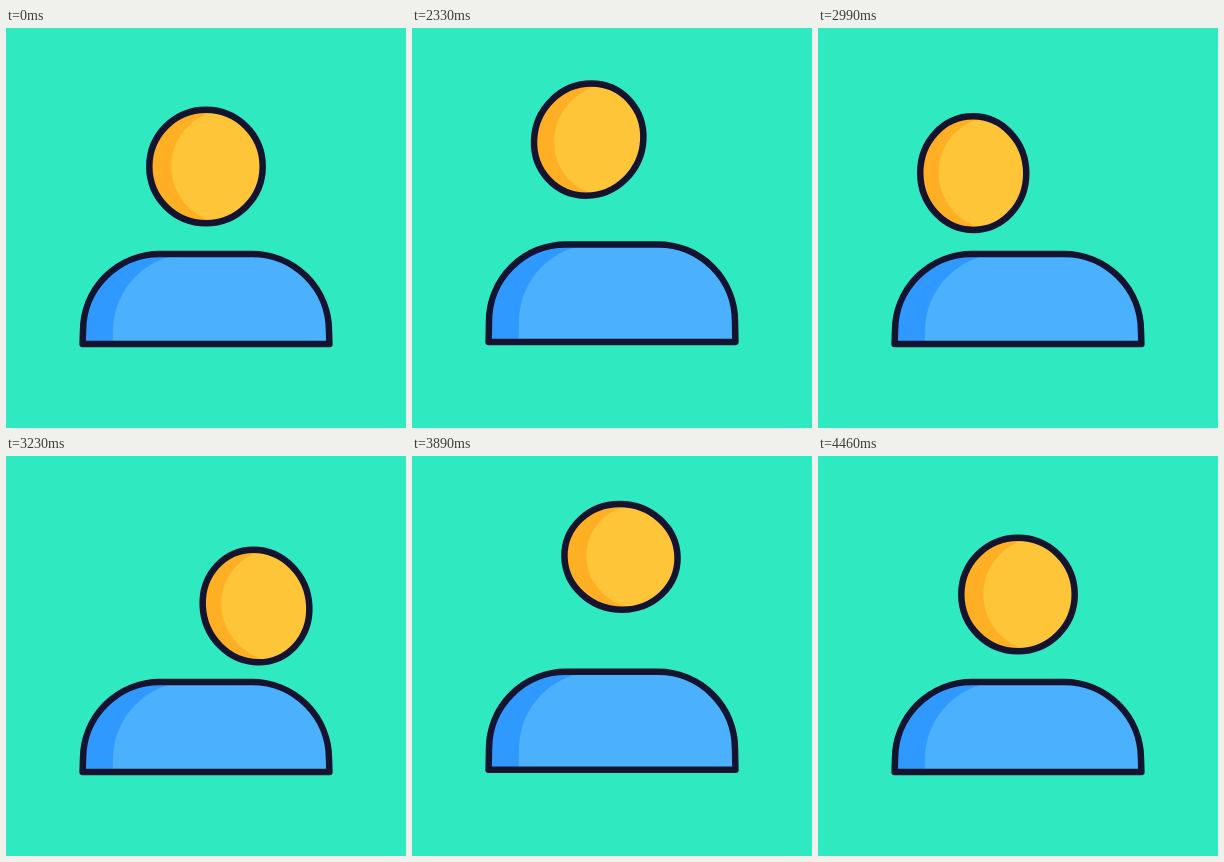
An HTML page with a canvas for the animation above (4.55 s loop, 400x400 px).

```html
<!DOCTYPE html>
<html lang="en">
<head>
<meta charset="utf-8">
<title>Person icon</title>
<style>
  html, body { margin: 0; width: 100%; height: 100%; overflow: hidden; background: #2feac1; }
  canvas { display: block; width: 100vmin; height: 100vmin; }
</style>
</head>
<body>
<canvas id="stage" width="400" height="400"></canvas>
<script>
const ctx = document.getElementById('stage').getContext('2d');
const LOOP = 4550;
const RADIUS = 56.7;
const COLORS = {
  back: '#2feac1', line: '#151430',
  head: '#ffc538', headShade: '#ffaf24',
  body: '#4bb1ff', bodyShade: '#3099ff'
};

// Pose: head x, head y, half width, half height, lean, body lift
const rest = [200, 138.5, RADIUS, RADIUS, 0, 0];
const left = [135.7, 150, 50.3, 56.8, 0.5, 0];
const right = [263, 151, 50.3, 56.8, 0, 0];

const keys = [
  [0, rest],
  [2000, rest],
  [2030, [200, 121, RADIUS, 55.6, 0, 5.7]],
  [2150, [200, 88.5, RADIUS, 49, 0, 35]],
  [2240, [194, 95, 56.2, 53, 0, 25]],
  [2360, [170, 118, 54, 56.5, -3, 6]],
  [2480, [144, 143, 51.5, 56.8, -2, 0]],
  [2600, left],
  [2900, left],
  [3100, rest],
  [3230, [250, 150, 53.3, 56.3, 2.5, 0]],
  [3350, right],
  [3530, right],
  [3650, [252, 136.5, 54, 54.5, 5, 0]],
  [3800, [224, 112, 56, 55, 4, 2]],
  [3950, [203, 96, RADIUS, 51, 0, 18]],
  [4070, [200, 92, RADIUS, 48.9, 0, 34]],
  [4100, [200, 92, RADIUS, 48.8, 0, 32.6]],
  [4220, [200, 117, RADIUS, 55, 0, 13]],
  [4340, [200, 136.5, RADIUS, RADIUS, 0, 1.5]],
  [4460, rest],
  [LOOP, rest]
];

// Smooth tangent that never overshoots a key
function slope(k, c) {
  if (k === 0 || k === keys.length - 1) return 0;
  const [a, b, d] = [keys[k - 1], keys[k], keys[k + 1]];
  const before = (b[1][c] - a[1][c]) / (b[0] - a[0]);
  const after = (d[1][c] - b[1][c]) / (d[0] - b[0]);
  return before * after <= 0 ? 0 : 2 * before * after / (before + after);
}

function poseAt(time) {
  let k = 0;
  while (time >= keys[k + 1][0]) k++;
  const [start, from] = keys[k];
  const [end, to] = keys[k + 1];
  const span = end - start;
  const u = (time - start) / span;
  const ease = u * u * (3 - 2 * u);
  return from.map((value, c) =>
    value + (to[c] - value) * ease
    + span * u * (1 - u) * ((1 - u) * slope(k, c) - u * slope(k + 1, c)));
}

function fill(path, color) {
  ctx.fillStyle = color;
  ctx.fill(path);
}

function outline(path) {
  ctx.strokeStyle = COLORS.line;
  ctx.lineWidth = 6.5;
  ctx.lineJoin = 'round';
  ctx.stroke(path);
}

function fillInside(clip, path, color) {
  ctx.save();
  ctx.clip(clip);
  fill(path, color);
  ctx.restore();
}

function bodyPath(lift, shift) {
  const top = 226 - lift;
  const bottom = 316 - lift * 0.22;
  const path = new Path2D();
  path.moveTo(76.6 + shift, bottom);
  path.lineTo(77 + shift, top + 77);
  path.arc(154 + shift, top + 77, 77, Math.PI, Math.PI * 1.5);
  path.arc(246 + shift, top + 77, 77, -Math.PI / 2, 0);
  path.lineTo(323.4 + shift, bottom);
  path.closePath();
  return path;
}

function drawBody(lift) {
  const shape = bodyPath(lift, 0);
  fill(shape, COLORS.bodyShade);
  fillInside(shape, bodyPath(lift, 30), COLORS.body);
  outline(shape);
}

function drawHead(x, y, w, h, lean) {
  // Horizontal shear follows the lean of the head
  const oval = (offset, width, from = 0, to = Math.PI * 2) => {
    const flat = new Path2D();
    flat.ellipse(offset, 0, width, h, 0, from, to);
    const path = new Path2D();
    path.addPath(flat, new DOMMatrix([1, 0, lean / h, 1, x, y]));
    return path;
  };
  const shape = oval(0, w);
  fill(shape, COLORS.headShade);
  fill(oval(0, 56.2, Math.PI / 2, Math.PI * 1.5), COLORS.headShade);
  fillInside(shape, oval(22, RADIUS), COLORS.head);
  outline(shape);
}

function draw(now) {
  const [x, y, w, h, lean, lift] = poseAt(now % LOOP);
  ctx.fillStyle = COLORS.back;
  ctx.fillRect(0, 0, 400, 400);
  drawBody(lift);
  drawHead(x, y, w, h, lean);
}

let origin;
function tick(now) {
  origin ??= now;
  draw(Math.max(0, now - origin));
  requestAnimationFrame(tick);
}
draw(0);
requestAnimationFrame(tick);
</script>
</body>
</html>
```
